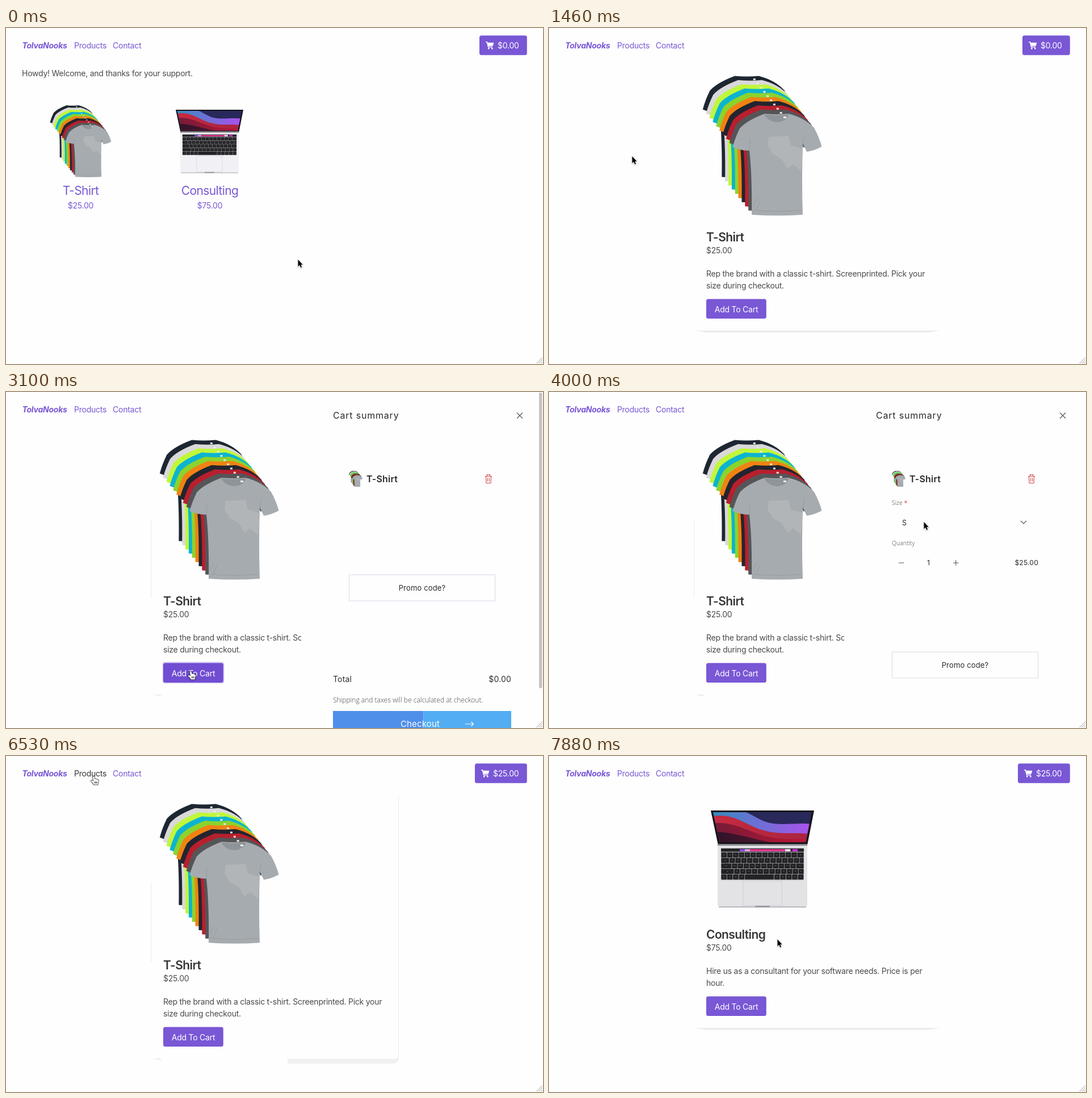
Recreate the animation shown at these times as an HTML page with a canvas. Size 946 by 592 pixels, loop 8000 ms.

```html
<!DOCTYPE html>
<html lang="en">
<head>
<meta charset="utf-8">
<title>Shop demo</title>
<style>
html, body { margin: 0; width: 100%; height: 100%; overflow: hidden; background: #fefefe; }
canvas { display: block; }
</style>
</head>
<body>
<canvas id="stage" width="946" height="592"></canvas>
<script>
const ctx = document.getElementById('stage').getContext('2d');
const LOOP = 8000;
const PURPLE = '#7957d5', DARK = '#363636', BODY = '#4a4a4a', PAPER = '#fefefe';

// start, end, steps, x, y
const MOVES = [
  [140, 1020, 7, 146, 225],
  [1910, 2510, 5, 325, 491],
  [3550, 4450, 7, 878, 57],
  [4600, 4750, 2, 903, 42],
  [5790, 6530, 6, 154, 35],
  [7130, 7430, 3, 376, 148],
  [7880, 7880, 1, 402, 322],
];

function pointer(t) {
  let x = 514, y = 407;
  for (const [start, end, steps, toX, toY] of MOVES) {
    if (t < start) break;
    const gap = steps > 1 ? (end - start) / (steps - 1) : 1;
    const p = Math.min(1, (Math.floor((t - start) / gap + 0.01) + 1) / steps);
    const e = p * p * (3 - 2 * p);
    x += (toX - x) * e;
    y += (toY - y) * e;
  }
  return { x: Math.round(x), y: Math.round(y) };
}

function text(str, x, y, o = {}) {
  const { size = 14, weight = 400, color = BODY, align = 'left', font = 'Inter', track = -0.0175, style = '' } = o;
  ctx.font = `${style} ${weight} ${size}px "${font}", sans-serif`;
  ctx.letterSpacing = `${size * track}px`;
  ctx.textAlign = align;
  ctx.fillStyle = color;
  ctx.fillText(str, x, y);
}

function rect(x, y, w, h, color, radius = 0) {
  ctx.fillStyle = color;
  ctx.beginPath();
  ctx.roundRect(x, y, w, h, radius);
  ctx.fill();
}

function poly(points, color) {
  ctx.fillStyle = color;
  ctx.beginPath();
  points.forEach(([x, y]) => ctx.lineTo(x, y));
  ctx.closePath();
  ctx.fill();
}

function fill(d, color) {
  ctx.fillStyle = color;
  ctx.fill(new Path2D(d));
}

function stroke(d, color, width = 1) {
  ctx.strokeStyle = color;
  ctx.lineWidth = width;
  ctx.stroke(new Path2D(d));
}

function place(x, y, scale, originX, originY, draw) {
  ctx.save();
  ctx.translate(x, y);
  ctx.scale(scale, scale);
  ctx.translate(-originX, -originY);
  draw();
  ctx.restore();
}

const SHIRT = 'M380 151Q401 153 422 151Q450 158 467 176Q476 192 480.5 209Q468 216 454 218L447 203Q445 270 447 329Q402 332 357 329Q358 260 353 216Q337 216 323.5 210Q328 193 336 177Q348 163 380 151Z';
const SHIRT_COLORS = ['#555558', '#b81f2d', '#22252f', '#f08213', '#8bd32e', '#0cb4d0', '#c0f73b', '#d9d9da', '#1e2632'];

function shirts() {
  for (let k = 9; k >= 0; k--) {
    ctx.save();
    ctx.translate(-5.85 * k, -7.4 * k);
    fill(SHIRT, k ? SHIRT_COLORS[k - 1] : '#a6abaf');
    rect(412.5, 155.5, 4, 3, '#e9e9e9');
    ctx.restore();
  }
  fill('M379 152Q401 155 423 152Q418 165 402 166Q386 165 379 152Z', '#8f9498');
  rect(413, 156, 5, 3, '#f0f0f0');
  fill('M387 192L422 190L426 207L447 213L444 252L430 240L420 248L410 231L394 222L385 207Z', '#b1b5b8');
  stroke('M353 216L354 196M447 204L450 188M360 321Q402 325 445 321M366 300L360 314M372 304L365 321', '#989da1');
}

function wave(d, left, right) {
  const g = ctx.createLinearGradient(290, 0, 462, 0);
  g.addColorStop(0, left);
  g.addColorStop(1, right);
  fill(d, g);
}

function keyboard() {
  rect(303, 162.5, 146, 56, '#8f8f95', 1);
  rect(303, 163, 146, 5.5, '#242427');
  rect(336, 164, 16, 4, '#8550e0');
  rect(345, 164, 9, 4, '#d4a6dc');
  rect(354, 164, 72, 4, '#dd3890');
  rect(416, 164, 9, 4, '#efdcf1');
  rect(429, 164, 9, 4, '#d32bd3');
  const key = (x, y, w) => {
    rect(x, y, w, 8.7, '#222225', 1);
    rect(x + w / 2 - 1, y + 3.5, 2, 1, '#77777c');
  };
  for (let row = 0; row < 4; row++) {
    const y = 170 + row * 9.7, first = 9.4 + row * 4.2;
    key(303.5, y, first);
    let x = 304.5 + first;
    for (; x < 432; x += 10.3) key(x, y, 9.4);
    key(x, y, 448.5 - x);
  }
  for (let col = 0; col < 14; col++) {
    if (col < 4 || col > 8) key(303.5 + col * 10.4, 208.8, 9.4);
  }
  rect(345, 208.8, 51, 8.7, '#222225', 1);
}

function laptop(base) {
  poly([[285, 96], [467, 96], [455, 157], [298, 157]], '#15141a');
  ctx.save();
  ctx.clip(new Path2D('M289 99H463L452 152H301Z'));
  rect(285, 96, 182, 61, '#28285a');
  wave('M285 96H335C355 98 370 116 395 119S445 116 467 121V157H285Z', '#358bc0', '#ad51ed');
  wave('M285 107C325 98 345 122 378 131S430 133 467 138V157H285Z', '#c62b40', '#a8243f');
  wave('M285 119C325 113 350 134 385 142S440 144 467 148V157H285Z', '#741b38', '#bd1735');
  wave('M285 134C320 132 355 146 400 154V157H285Z', '#301329', '#5f1632');
  ctx.restore();
  rect(297, 155, 158, 112, base, [0, 0, 6, 6]);
  rect(297, 155, 158, 3, '#8d8d91');
  keyboard();
  ctx.strokeStyle = '#cfcfd4';
  ctx.lineWidth = 1;
  ctx.strokeRect(341.5, 220.5, 69, 43);
  rect(299, 265, 154, 2, '#b8b8bc', 1);
  rect(363, 264, 26, 2.5, '#97979c', 1);
}

function cartIcon(x, y) {
  ctx.save();
  ctx.translate(x, y);
  stroke('M.5 1.2H3L5.2 10H12.5', '#fff', 1.6);
  poly([[3.2, 2.2], [14.8, 2.2], [13.2, 8.3], [4.8, 8.3]], '#fff');
  ctx.fillStyle = '#fff';
  for (const cx of [5.8, 11.8]) {
    ctx.beginPath();
    ctx.arc(cx, 12.4, 1.5, 0, 7);
    ctx.fill();
  }
  ctx.restore();
}

function button(x, y, w, hovered) {
  rect(x, y, w, 34.6, hovered ? '#714dd2' : PURPLE, 3.5);
}

function header(price, hover) {
  text('TolvaNooks', 28.5, 36, { weight: 700, style: 'italic', color: PURPLE });
  text('Products', 120, 36, { color: hover === 'products' ? DARK : PURPLE });
  text('Contact', 188, 36, { color: PURPLE });
  const left = price === '$0.00' ? 834 : 826;
  button(left, 13.2, 917.8 - left, hover === 'total');
  cartIcon(left + 10.5, 23.5);
  text(price, left + 32, 36, { color: '#fff' });
}

function catalogue(dy, hover) {
  if (!dy) text('Howdy! Welcome, and thanks for your support.', 28, 85);
  place(77, 136 + dy, 0.515, 270, 84, shirts);
  place(299, 144 + dy, 0.654, 285, 96, () => laptop(dy ? '#e3e3e6' : '#f1f1f5'));
  const label = (name, price, x, key) => {
    const o = { align: 'center', color: hover === key ? DARK : PURPLE };
    text(name, x, 294 + dy, { ...o, size: 21, track: -0.028 });
    text(price, x, 317.5 + dy, o);
  };
  label('T-Shirt', '$25.00', 131.5, 'shirt');
  label('Consulting', '$75.00', 359, 'consulting');
}

const ITEMS = {
  shirt: ['T-Shirt', '$25.00', 'Rep the brand with a classic t-shirt. Screenprinted. Pick your', 'size during checkout.'],
  consulting: ['Consulting', '$75.00', 'Hire us as a consultant for your software needs. Price is per', 'hour.'],
};

function shadows(t, dy) {
  const edge = '#ebebeb';
  if (t >= 3100 && t < 7580) {
    if (t >= 5490) {
      rect(496, 525, 196, 17, '#f1f1f1', [0, 0, 10, 0]);
      rect(496, 500, 195, 33.5, PAPER, [0, 0, 5, 0]);
      rect(691, 70, 1, 462, '#ececec');
    }
    poly([[258, 533], [270, 533], [276, 536], [266, 535]], edge);
  } else {
    poly([[258, 533 + dy], [688, 533 + dy], [670, 536.5 + dy], [276, 536.5 + dy]], edge);
  }
  if (t >= 2200 && t < 6980) rect(255, 224, 1, 139, '#ececec');
}

function detail(key, t, hover) {
  const dy = key === 'shirt' ? 0 : -54;
  const [name, price, line1, line2] = ITEMS[key];
  shadows(t, dy);
  if (key === 'shirt') shirts();
  else laptop('#e3e3e6');
  text(name, 277, 375.5 + dy, { size: 21, weight: 600, color: DARK, track: -0.028 });
  text(price, 277, 397 + dy);
  text(line1, 277, 437.5 + dy);
  text(line2, 277, 458.5 + dy);
  if (hover === 'add' && t >= 3100) rect(275.5, 475.5, 109, 38, '#d6ccf2', 4.5);
  button(277, 477.4 + dy, 105.8, hover === 'add');
  text('Add To Cart', 330, 500.5 + dy, { color: '#fff', align: 'center' });
}

function cartPanel(t) {
  const loaded = t >= 3550;
  const dy = loaded ? 136 : 0;
  const ink = (size, more = {}) => ({ size, weight: 400, color: '#2b2b30', track: 0.012, ...more });
  const small = { size: 10.5, weight: 300, font: 'Open Sans', track: 0, color: '#444' };
  rect(520, 0, 426, 592, PAPER);
  text('Cart summary', 576, 47, ink(16, { track: 0.05 }));
  stroke('M900 36.5L910 46.5M910 36.5L900 46.5', '#555', 1.1);
  place(604, 139, 0.114, 270, 84, shirts);
  text('T-Shirt', 635, 159, ink(16, { weight: 600 }));
  stroke('M844 148.5H856M847.5 148V145.5H852.5V148M845.5 149L846 160.5H854L854.5 149M848.5 151.5V157.5M851.5 151.5V157.5', '#d04a50', 1.1);
  if (loaded) {
    text('Size', 604, 199, small);
    text('*', 625.5, 199, { ...small, weight: 400, color: '#e03b3b' });
    text('S', 622, 234.5, ink(12.5));
    stroke('M831 227L836 232L841 227', '#555', 1.1);
    text('Quantity', 604, 270, small);
    stroke('M616 301H625.5M712 301H721.5M716.75 296.2V305.8', '#555', 1.1);
    text('1', 668.5, 305, ink(12.2, { align: 'center' }));
    text('$25.00', 862, 305, ink(12.2, { align: 'right' }));
  }
  ctx.strokeStyle = loaded ? '#dcdcde' : '#d8daea';
  ctx.lineWidth = 1;
  ctx.strokeRect(604.5, 322 + dy, 257, 46);
  text('Promo code?', 733, 350 + dy, ink(13, { align: 'center' }));
  text('Total', 576, 510.5 + dy, ink(14));
  text(loaded ? '$25.00' : '$0.00', 890, 510.5 + dy, ink(14, { align: 'right' }));
  text('Shipping and taxes will be calculated at checkout.', 576, 546.5 + dy, { ...small, size: 12 });
  rect(576, 562 + dy, 159.5, 40, '#4f8fea');
  rect(735.5, 562 + dy, 154.5, 40, '#52adf3');
  text('Checkout', 729.5, 590 + dy, ink(15, { align: 'center', color: '#fff' }));
  if (!loaded) stroke('M809 585H823.5M819.5 581L823.5 585L819.5 589', '#fff', 1.1);
  if (t < 3850) rect(939, 1, 5.5, 521, '#c4c4c4', 3);
}

const ARROW = 'M.5 1V13.2L3.2 10.7L5.2 15.1L7.2 14.2L5.3 9.9H8.8Z';
const HAND = 'M3.8 1.6C4.6.2 6.3.6 6.6 2L7.4 5.6C8.3 4.9 9.4 5.2 9.8 6.1C10.7 5.6 11.7 5.9 12 6.8C13 6.5 13.9 7.1 13.9 8.2C14 10.6 12.8 12 12.6 15.4H6C4.8 13.4 2.7 11.6 1 9.4C.3 8.2 1.5 7.3 2.7 8L4.9 9.5Z';

function cursor({ x, y }, hand) {
  const shape = hand ? HAND : ARROW;
  ctx.save();
  ctx.translate(hand ? x - 5 : x, y);
  ctx.lineJoin = 'round';
  ctx.shadowColor = 'rgba(0,0,0,.3)';
  ctx.shadowBlur = 2;
  ctx.shadowOffsetY = 1;
  stroke(shape, hand ? '#000' : '#fff', hand ? 1.2 : 1.6);
  ctx.shadowColor = 'transparent';
  fill(shape, hand ? '#fff' : '#000');
  if (hand) stroke('M7.4 10V13.4M9.2 10V13.4M11 10V13.4', '#000', 0.8);
  ctx.restore();
}

function pageAt(t) {
  if (t < 1460) return 'home';
  if (t < 6980) return 'shirt';
  return t < 7580 ? 'products' : 'consulting';
}

function hoverTarget({ x, y }, page, cartOpen, dy) {
  const within = (l, top, r, b) => x >= l && x <= r && y >= top && y <= b;
  if (cartOpen && x > 520) return within(892, 28, 918, 56) ? 'close' : '';
  if (within(120, 12, 179, 50)) return 'products';
  if (within(826, 13, 918, 48)) return 'total';
  if (page === 'home' || page === 'products') {
    if (within(61, 130 + dy, 201, 325 + dy)) return 'shirt';
    if (within(289, 130 + dy, 429, 325 + dy)) return 'consulting';
  }
  if (page === 'shirt' && within(277, 477, 383, 512)) return 'add';
  return '';
}

function render(t) {
  const page = pageAt(t);
  const cartOpen = t >= 3100 && t < 5490;
  const dy = page === 'products' ? -65 : 0;
  const at = pointer(t);
  const hover = hoverTarget(at, page, cartOpen, dy);
  rect(0, 0, 946, 592, PAPER);
  header(t < 3550 ? '$0.00' : '$25.00', hover);
  if (page === 'home' || page === 'products') catalogue(dy, hover);
  else detail(page, t, hover);
  if (cartOpen) cartPanel(t);
  stroke('M934.5 591L945 580.5M938.5 591L945 584.5M942.5 591L945 588.5', '#999');
  cursor(at, hover !== '');
}

function tick() {
  render(performance.now() % LOOP);
  requestAnimationFrame(tick);
}
tick();
</script>
</body>
</html>
```
